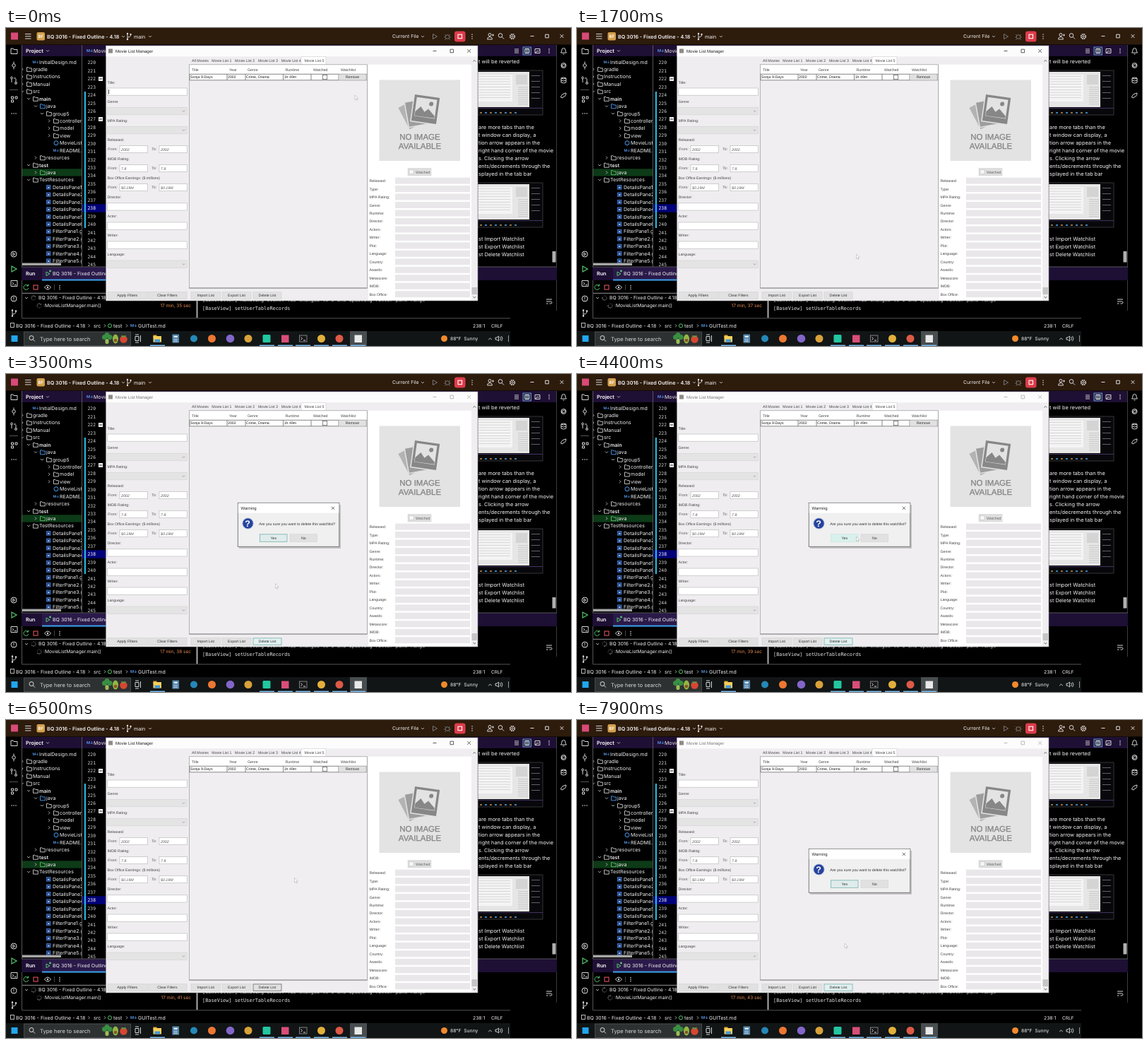
Write an HTML page that moves like this. It is 800 px wide and 450 px high and loops after 8000 ms.

```html
<!DOCTYPE html>
<html lang="en">
<head>
<meta charset="utf-8">
<title>Movie list manager</title>
<style>
html, body { margin: 0; width: 100%; height: 100%; overflow: hidden; background: #000; }
svg { display: block; width: 800px; height: 450px; }
text { text-rendering: geometricPrecision; white-space: pre; }
.ide { font-family: Inter, "Open Sans", sans-serif; }
.app { font-family: "Liberation Sans", Arial, sans-serif; }
.mono { font-family: "DejaVu Sans Mono", monospace; }
</style>
</head>
<body>
<svg id="stage" viewBox="0 0 800 450"></svg>
<script>
const LOOP = 8000;
const PROJECT = "BQ 3016 - Fixed Outline - 4.18";
const HEADER = "#1e0f35";
const stage = document.getElementById("stage");
let layer = stage;

function el(tag, attrs, parent = layer) {
  const node = document.createElementNS("http://www.w3.org/2000/svg", tag);
  for (const key in attrs) node.setAttribute(key, attrs[key]);
  parent.append(node);
  return node;
}
const rect = (x, y, w, h, fill, more = {}) => el("rect", { x, y, width: w, height: h, fill, ...more });
const box = (x, y, w, h, fill, stroke, sw = 0.7) => rect(x, y, w, h, fill, { stroke, "stroke-width": sw });
const dot = (cx, cy, r, fill, more = {}) => el("circle", { cx, cy, r, fill, ...more });
const line = (d, stroke = "#d6d6d6", sw = 1, more = {}) =>
  el("path", { d, stroke, "stroke-width": sw, fill: "none", ...more });
// y is the middle of the capitals
function text(str, x, y, size, fill, cls, more = {}) {
  const node = el("text", { x, y: y + size * 0.36, "font-size": size, fill, class: cls, ...more });
  node.textContent = str;
  return node;
}
const ide = (str, x, y, size = 7, fill = "#f2f2f2", more) => text(str, x, y, size, fill, "ide", more);
const app = (str, x, y, fill = "#444", more) => text(str, x, y, 5.25, fill, "app", more);
const mono = (str, x, y, size, fill = "#e4e4e4") => text(str, x, y, size, fill, "mono");
const bold = { "font-weight": 600 };
const mid = { "text-anchor": "middle" };
const chevron = (x, y, r = 2, color = "#bbb", up = 1) =>
  line(`M${x - r} ${y - up * r / 2}l${r} ${up * r}l${r} ${-up * r}`, color, 0.9);
const next = (x, y) => line(`M${x - 1} ${y - 2}l2 2l-2 2`, "#bbb", 0.9);
function group(parent = stage, attrs = {}) {
  layer = el("g", attrs, parent);
  return layer;
}
function dots(x, y, dx, dy) {
  for (const k of [-1, 0, 1]) dot(x + k * dx, y + k * dy, 0.8, "#d6d6d6");
}
function lens(x, y, r = 2.8) {
  dot(x - 1, y - 1, r, "none", { stroke: "#ddd", "stroke-width": 1 });
  line(`M${x + 1} ${y + 1}l3 3`);
}
function controls(x, y, gap, color, sw = 0.8) {
  return line(`M${x - 2.5} ${y}h5M${x + gap - 2.3} ${y - 2.3}h4.6v4.6h-4.6z` +
    `M${x + 2 * gap - 2.4} ${y - 2.4}l4.8 4.8m0 -4.8l-4.8 4.8`, color, sw);
}

function drawTopBar() {
  rect(0, 0, 800, 23.5, "#2d1b0c");
  rect(7, 6.5, 10, 10, "#d84a78");
  line("M27 8.5h8.5M27 11.7h8.5M27 15h8.5");
  rect(43.5, 6, 11.5, 11.5, "#d3a04c", { rx: 2 });
  ide("BF", 49.2, 11.8, 6, "#fff", { ...bold, ...mid });
  ide(PROJECT, 58, 12, 7.2, "#f2f2f2", bold);
  chevron(166, 12);
  line("M172 8.5v7M172 13q4.5 0 4.5-3");
  dot(172, 8, 1.2, "#ddd"); dot(176.5, 9, 1.2, "#ddd"); dot(172, 16, 1.2, "#ddd");
  ide("main", 181, 12, 7.2);
  chevron(204, 12);
  ide("Current File", 547, 12, 6.8);
  chevron(590, 12);
  line("M604.5 8.5l6 3.5l-6 3.5z", "#777");
  dot(625, 12.5, 2.8, "none", { stroke: "#777" });
  line("M621 9l2 2M629 9l-2 2M620 13h2m6 0h2M621 17l2-2m6 2l-2-2", "#777", 0.8);
  rect(635, 4.5, 15.5, 15, "#dd3c4b", { rx: 3 });
  box(640, 9.2, 5.5, 5.5, "none", "#fff", 1.1);
  dots(660, 12, 0, 3);
  dot(685, 9.5, 2, "none", { stroke: "#ddd" });
  line("M681.5 16q0-3.5 3.5-3.5t3.5 3.5zM688 10h3m-1.5-1.5v3");
  lens(701, 11.5);
  dot(717, 12, 3.3, "none", { stroke: "#ddd", "stroke-width": 1.6, "stroke-dasharray": "1.8 .8" });
  dot(717, 12, 1.3, "none", { stroke: "#ddd", "stroke-width": 0.8 });
  controls(745, 11.5, 21, "#ddd", 1);
}

function drawSidebars() {
  line("M7 29h3l1 1.5h5v6h-9z");
  dot(11, 53, 2.3, "none", { stroke: "#d6d6d6" });
  line("M11 47.5v3M11 55.5v3");
  line("M8 72v5M14 72v5M11 71h3");
  dot(8, 70.5, 1.4, "none", { stroke: "#ddd" }); dot(14, 78, 1.4, "none", { stroke: "#ddd" });
  line("M5 87.5h12", "#555");
  line("M7.5 97h3v3h-3zM13 97h3v3h-3zM7.5 102h3v3h-3z");
  dots(11, 121, 3, 0);
  dot(11, 320, 4, "none", { stroke: "#ddd" });
  line("M9.8 318l3 2l-3 2z");
  line("M8 337l7 4l-7 4z", "#56c66c", 1.2);
  line("M7 357.5h9v8h-9zM9 360l2 1.7l-2 1.7M12 363.5h2.5");
  dot(11, 383, 4, "none", { stroke: "#ddd" });
  line("M11 380.5v3M11 384.5v1");
  line("M9 400v7M9 405q5 0 5-4");
  dot(9, 399.5, 1.2, "#ddd"); dot(14, 400.5, 1.2, "#ddd"); dot(9, 407.5, 1.2, "#ddd");
  line("M785.5 35q1.5-1.5 1.5-4a2.5 2.5 0 0 1 5 0q0 2.5 1.5 4zM788.5 37h2");
  dot(789.5, 53, 3.5, "none", { stroke: "#ddd" });
  line("M787 55q0-4 3-4t1 3t-4-1", "#ddd", 0.9);
  line("M786 71v6q3.5 2 7 0v-6q-3.5-2-7 0q3.5 2 7 0M786 74q3.5 2 7 0");
  line("M785.5 98q1-5 7.5-6q0 5-4 5.5l-1 1.5z");
}

function drawTree() {
  rect(22, 24, 85, 16, HEADER);
  ide("Project", 28, 32.3, 7.3, "#fff", bold);
  chevron(59, 32.3);
  // name, indent, kind: d folder, b bold folder, f file, m class, g diagram
  const rows = ["InitialDesign.md|47|f", "gradle|38|d", "Instructions|38|d", "Manual|38|d", "src|38|d",
    "main|47|b", "java|57|d", "group5|66|d", "controller|76|d", "model|76|d", "view|76|d", "MovieListManager|76|m",
    "README.md|76|f", "resources|57|d", "test|47|b", "java|57|d", "TestResources|47|d"];
  for (let i = 1; i <= 6; i++) rows.push(`DetailsPane${i}.gif|66|g`);
  for (let i = 1; i <= 5; i++) rows.push(`FilterPane${i}.gif|66|g`);
  const open = [4, 5, 6, 7, 14, 16];
  const clip = el("clipPath", { id: "tree" });
  el("rect", { x: 22, y: 41, width: 85, height: 295 }, clip);
  const outer = layer;
  group(outer, { "clip-path": "url(#tree)" });
  rows.forEach((row, i) => {
    const [name, indent, kind] = row.split("|");
    const x = +indent, y = 48 + i * 10.43;
    if (i === 15) rect(22, y - 5.2, 85, 10.4, "#0d3a17");
    if (kind === "d" || kind === "b") {
      const color = i === 6 ? "#4a9df0" : i === 15 ? "#5bc46b" : "#cfcfcf";
      line(`M${x - 8.5} ${y - 2.8}h2.4l1 1.2h3.4v4.8h-6.8z`, color, 0.9);
      if (open.includes(i)) chevron(x - 15, y); else next(x - 15, y);
    } else if (kind === "m") {
      dot(x - 5, y, 3, "none", { stroke: "#4a9df0" });
    } else if (kind === "g") {
      box(x - 8.5, y - 2.7, 5.5, 5.5, "#1b3f7c", "#4a7fd6", 0.8);
      rect(x - 7, y - 0.5, 2.5, 1.8, "#a9c8f5");
    } else {
      ide("M↓", x - 9.5, y, 5, "#5a9df2", bold);
    }
    ide(name, x, y, 7, "#f2f2f2", kind === "b" ? bold : {});
  });
  layer = outer;
  rect(23, 332.5, 55, 3.5, "#a6a6a6");
  line("M22.5 24V410M107.5 24V338", "#6b6b6b", 0.8);
}

function drawEditor() {
  rect(108, 24, 672, 16, HEADER);
  ide("M↓", 114, 32.3, 5.5, "#5a9df2", bold);
  ide("MovieList", 124, 32.3);
  rect(108, 249.3, 34, 11.4, "#000078");
  for (let i = 0; i < 26; i++) mono(220 + i, 115.5, 49 + i * 11.44, 6.4, i === 18 ? "#fff" : "#d2d2d2");
  rect(110.8, 90, 2.2, 193, "#29b6e0");
  for (const y of [72, 129]) {
    rect(131, y - 3, 6, 6, "#f2f2f2");
    line(`M132 ${y}h4`, "#111", 0.9);
  }
}

function thumbnail(y) {
  rect(668, y, 92, 63, "#08080c");
  rect(668, y + 2, 73, 50, "#e6e6e6");
  rect(668, y + 6, 49, 38, "#f4f4f4");
  for (let i = 0; i < 9; i++) {
    rect(669, y + 8 + i * 3.8, 45, 0.6, "#c4c4c4");
    rect(725, y + 23 + i * 3, 14, 1.4, "#cfcfcf");
  }
  rect(722, y + 6, 16, 14, "#d4d4d4");
  for (let i = 0; i < 5; i++) rect(744, y + 7 + i * 8, 12, 0.8, "#77777d");
  rect(668, y + 53, 92, 1, "#43325f");
  for (let i = 0; i < 8; i++) rect(671 + i * 7, y + 59, 3, 2, i % 2 ? "#3f7fae" : "#8a7042");
  box(668, y, 92, 63, "none", "#555", 0.6);
}

function drawPreview() {
  rect(668, 40.5, 111, 297, "#000");
  line("M720 30h6M720 32.5h6M720 35h6");
  box(732, 27, 11.5, 11, "#26324e", "#7fa5e8", 0.8);
  line("M735 29.5h5.5v6h-5.5zM737.8 29.5v6", "#fff", 0.9);
  line("M749 29.5h7v6h-7zM750 35l2-3l1.5 1.5l1.5-2");
  dots(769, 32.5, 0, 2.6);
  const size = 7.4, left = 669;
  ide("t will be reverted", left, 47, size);
  thumbnail(60);
  ["are more tabs than the", "t window can display, a", "tion arrow appears in the", "right hand corner of the movie",
    "s. Clicking the arrow", "ents/decrements through the", "splayed in the tab bar"]
    .forEach((str, i) => ide(str, left, 140 + i * 11.05, size));
  thumbnail(219);
  ["Import", "Export", "Delete"].forEach((verb, i) => ide(`st ${verb} Watchlist`, left, 298.5 + i * 10.8, size));
  rect(773.5, 316, 5, 15.5, "#b0b0b0");
  line("M779.5 24V400", "#4d4d4d", 0.8);
}

let clock, spinners = [];
function drawRun() {
  rect(22, 338, 758, 19, HEADER);
  line("M22 338h758", "#6b6b6b", 0.8);
  ide("Run", 28, 347.7, 7.2, "#fff", bold);
  rect(51, 339, 92, 17, "#2a1a4a");
  line("M57 345l5 2.8l-5 2.8z", "#56c66c");
  dot(62.5, 344, 1.4, "#56c66c");
  ide(PROJECT, 66, 347.7, 7);
  rect(51, 355.6, 92, 1.9, "#3fa9f5");
  line("M31 364.5a3.5 3.5 0 1 0 .8 3.5M31.5 362.5v2.5h-2.5", "#56c66c");
  box(39, 364, 6, 6, "none", "#e0525e", 1.1);
  line("M54.5 367q4.5-6 9 0q-4.5 6-9 0z");
  dot(59, 367, 1.2, "#ddd");
  dots(76, 367, 0, 2.5);
  line("M68.5 363v8", "#555", 0.8);
  line("M23 375.3H270.5", "#a8a8a8", 0.9);
  line("M270.5 375.3V410", "#d8d8d8", 1.5);
  line("M22 410.8h692", "#6b6b6b", 0.8);
  chevron(29, 382, 2);
  ide(PROJECT, 46, 382, 6.8);
  ide(":MovieListManager.main()", 53, 393, 6.7);
  for (const [x, y] of [[39, 382], [47, 393]]) {
    const g = el("g", {});
    for (let k = 0; k < 8; k++) {
      const a = k * Math.PI / 4;
      el("circle", { cx: x + 3 * Math.cos(a), cy: y + 3 * Math.sin(a), r: 0.7, fill: "#ddd", opacity: 0.2 + k * 0.1 }, g);
    }
    spinners.push([g, x, y]);
  }
  clock = ide("", 262, 393, 6.5, "#e58a52", { "text-anchor": "end" });
  mono("[Controller] Handling event: Tab changed to 5 and updating filter pane range", 278, 385, 6.9);
  mono("[BaseView] setUserTableRecords", 278, 397, 6.9);
  line("M765 384h8M765 387h6.5q1.5 0 1.5 1.5t-1.5 1.5h-2M765 390h2.5");
}

function drawBottom() {
  box(6.5, 417.5, 5, 6, "none", "#ccc", 0.9);
  ide(PROJECT, 14, 421.3, 7);
  next(117.5, 421.3);
  ide("src", 124, 421.3);
  next(140, 421.3);
  dot(147, 421.3, 2.6, "none", { stroke: "#56c66c" });
  ide("test", 152, 421.3);
  next(171, 421.3);
  ide("M↓", 176, 421.3, 5.5, "#5a9df2", bold);
  ide("GUITest.md", 187, 421.3, 7);
  ide("238:1", 661, 421.3, 6.8);
  ide("CRLF", 687, 421.3, 6.5);
  rect(0, 429, 714, 21, "#111516");
  rect(7.5, 435, 9, 9, "#22a6ee");
  box(25.5, 430, 151, 19.5, "#2d3132", "#55595a");
  lens(37, 439.5, 3);
  text("Type here to search", 48, 440, 7.6, "#d5d5d5", "ide");
  rect(140.5, 440, 5, 7, "#9bbd56", { rx: 2 });
  for (const [x, y] of [[139.5, 437.5], [143, 434.5], [147, 437.5]]) dot(x, y, 3.5, "#398f42");
  el("ellipse", { cx: 155, cy: 440, rx: 4, ry: 6.5, fill: "#92b743" });
  dot(155, 442, 2.3, "#8a5229");
  dot(166.5, 440.5, 5.2, "#d84632");
  line("M163.5 435.5l3 1.5l3-1.5", "#55a645", 1.5);
  line("M183 436.5h5v6h-5zM190.5 435v9M183 434h5M183 445h5");
  rect(487, 429, 24, 21, "#484d4f");
  rect(208.5, 434.5, 5, 4, "#e0a82e");
  rect(208.5, 436, 11.5, 8.5, "#f7cf58");
  rect(210.5, 440.5, 7.5, 4, "#4699d6");
  box(236, 434, 8.5, 11, "#2e6b9c", "#90bddd");
  rect(237.5, 435.5, 5.5, 2.5, "#dfefff");
  for (let i = 0; i < 9; i++) rect(237.5 + i % 3 * 2, 439.3 + Math.floor(i / 3) * 1.8, 1.3, 1.1, "#fff");
  dot(266, 439.5, 5, "#2588b8");
  dot(291.5, 439.5, 5.5, "#ec7732");
  dot(317.5, 439.5, 5.8, "#8266c9");
  dot(343, 439.5, 5.5, "#d9a13a");
  rect(363.5, 434, 11, 11, "#22c6a0", { rx: 1.5 });
  rect(390, 434.5, 10.5, 10.5, "#d94e78");
  box(415.5, 435, 10.5, 9, "#171717", "#aaa");
  line("M417.5 437.5l2 2l-2 2M421 442h3");
  dot(446.5, 439.5, 5.5, "#e2b03a");
  dot(472, 439.5, 5.5, "#dd5a47");
  rect(493.5, 434.5, 10.5, 10.5, "#e9e9e9");
  for (const x of [204, 359, 385, 410, 436, 462, 488]) rect(x, 448.5, 21, 1.5, "#76b9ed");
  dot(620.5, 439.5, 4.5, "#f28a2c");
  ide("88°F  Sunny", 629, 440, 6.8);
  chevron(685.5, 440, 2.3, "#ddd", -1);
  line("M693 438h2l2.5-2v7l-2.5-2h-2zM699.5 437q2 2.5 0 5M701.5 436q3 3.5 0 7", "#ddd", 0.9);
  line("M711.5 435v9", "#aaa", 0.9);
}

const field = (x, y, w) => box(x, y, w, 10.2, "#fff", "#b4b4b4", 0.6);
function combo(y) {
  box(143.3, y, 113, 10.5, "#e4e4e4", "#d2d2d2", 0.6);
  chevron(251.5, y + 5.3, 1.6, "#999");
}
function button(label, x, y, w, h) {
  const face = box(x, y, w, h, "#e1e1e1", "#d0d0d0", 0.6);
  app(label, x + w / 2, y + h / 2, "#333", mid);
  return face;
}

let appTitle, appControls, caret, deleteButton;
function drawFilters() {
  const italic = { "font-style": "italic" };
  [["Title:", 77, 85], ["Director:", 239.5, 247.8], ["Actor:", 266.5, 275], ["Writer:", 293.5, 302]]
    .forEach(([label, y, top]) => { app(label, 143.5, y); field(143.3, top, 113); });
  [["Genre:", 104, 112.3], ["MPA Rating:", 131, 139.3], ["Language:", 320.5, 329]]
    .forEach(([label, y, top]) => { app(label, 143.5, y); combo(top); });
  [["Released:", 158, "2002", "2002"], ["IMDB Rating:", 185, "7.8", "7.8"],
    ["Box Office Earnings: ($ millions)", 212, "$0.19M", "$0.19M"]].forEach(([label, y, from, to]) => {
    app(label, 143.5, y);
    app("From:", 144, y + 13.5, "#555", italic);
    app("To:", 206, y + 13.5, "#555", italic);
    field(161, y + 8.5, 39.5);
    field(217, y + 8.5, 39.3);
    app(from, 163, y + 13.7, "#555", italic);
    app(to, 219, y + 13.7, "#555", italic);
  });
  caret = rect(145, 87, 0.8, 6.5, "#111");
  button("Apply Filters", 144, 373.5, 55.5, 10);
  button("Clear Filters", 201, 373.5, 55, 10);
}

function drawTable() {
  rect(418, 40.3, 35, 11.5, "#fff");
  line("M418 51.5V40.5h35v11", "#cfcfcf", 0.6);
  app("All Movies", 263, 46.3);
  for (let i = 1; i <= 5; i++) app(`Movie List ${i}`, 291.3 + (i - 1) * 32.8, i < 5 ? 46.3 : 45.8);
  box(259.5, 51.8, 252, 316.2, "#f0eef1", "#9a9a9a");
  rect(260, 52.5, 250.5, 12.5, "#fff");
  rect(260, 65.3, 250.5, 8.7, "#fff");
  const cols = [260, 313, 339, 392.5, 432, 471, 510];
  line("M260 65.3h250.5M260 73.8h250.5" + cols.map(x => `M${x} 65.3v8.5`).join(""), "#555", 0.7);
  [["Title", 263], ["Year", 316], ["Genre", 342], ["Runtime", 395.5], ["Watched", 435], ["Watchlist", 474]]
    .forEach(([label, x]) => app(label, x, 59.3));
  [["Sonja 9-Days", 261], ["2002", 314], ["Crime, Drama", 340], ["1h 49m", 393.7]]
    .forEach(([label, x]) => app(label, x, 69.6, "#222"));
  box(448.5, 66.5, 6.2, 6.2, "#fff", "#555");
  button("Remove", 471.5, 65.8, 38, 7.5);
  line("M259.5 368h252", "#777", 0.8);
  button("Import List", 262, 373.5, 41.5, 10);
  button("Export List", 306, 373.5, 41, 10);
  deleteButton = button("Delete List", 350, 373.8, 40, 9.4);
}

function drawPlaceholder() {
  rect(528.5, 73.5, 114.5, 114.5, "#e3e3e3");
  const edge = { stroke: "#e3e3e3", "stroke-width": 1.5 };
  rect(561, 103, 32, 36, "#b3b3b3", { ...edge, transform: "rotate(-28 577 121)" });
  rect(567, 102, 32, 36, "#9d9d9d", { ...edge, transform: "rotate(-10 583 120)" });
  const outer = layer;
  group(outer, { transform: "rotate(8 594 115)" });
  rect(575.5, 95.5, 37, 39, "#878787", edge);
  rect(579.5, 99.5, 29, 27, "#e3e3e3");
  el("path", { d: "M580 126v-6l7-8l6 7l5-5l10 9v3z", fill: "#878787" });
  dot(601, 106.5, 3, "#878787");
  layer = outer;
  const big = { ...mid, stroke: "#858585", "stroke-width": 0.3 };
  text("NO IMAGE", 586, 154, 11.5, "#858585", "app", big);
  text("AVAILABLE", 586, 167, 11.5, "#858585", "app", big);
}

function drawDetails() {
  rect(513, 51.8, 146, 333.7, "#fff");
  drawPlaceholder();
  box(569, 198.5, 33, 10.5, "#dedede", "#d2d2d2", 0.5);
  box(571, 200.5, 6, 6, "#f7f7f7", "#bbb", 0.5);
  app("Watched", 580, 203.9, "#666");
  ["Released", "Type", "MPA Rating", "Genre", "Runtime", "Director", "Actors", "Writer", "Plot", "Language",
    "Country", "Awards", "Metascore", "IMDB", "Box Office"].forEach((label, i) => {
    const y = 216.2 + i * 11.47;
    app(label + ":", 514.5, y);
    rect(551, y - 4.6, 106, 9, "#e9e7ea");
  });
  rect(659, 41, 8.5, 344.5, "#f0eef1");
  rect(659.5, 367, 7.5, 10, "#c6c6c6");
  chevron(663.3, 46.5, 1.9, "#555", -1);
  chevron(663.3, 381, 1.9, "#555");
}

function drawApp() {
  rect(141.5, 25, 526.5, 361, "#efedf0");
  rect(141.5, 25, 526.5, 15.3, "#fcfcfc");
  rect(145, 29.5, 6, 6, "#8f8a88");
  appTitle = text("Movie List Manager", 155, 32.5, 6.1, "#222", "app");
  appControls = controls(607, 32.5, 24.3, "#333");
  drawFilters();
  drawTable();
  drawDetails();
  box(141.5, 25, 526.5, 361, "none", "#8b8b8b", 0.6);
}

let yesFace;
function drawDialog() {
  const g = group();
  rect(330, 185, 144, 62, "#000", { opacity: 0.18 });
  box(328.3, 182.3, 143.5, 62, "#f0f0f0", "#6e6e6e", 0.9);
  rect(328.8, 182.8, 142.5, 14, "#fff");
  text("Warning", 332.5, 190, 6, "#222", "app");
  line("M460.8 187.7l4.2 4.2m0 -4.2l-4.2 4.2", "#444", 0.8);
  dot(342.5, 211.5, 7.6, "#27449f", { stroke: "#a9b4d8", "stroke-width": 0.8 });
  text("?", 342, 211.5, 12.5, "#fff", "app", { ...mid, "font-weight": 700 });
  app("Are you sure you want to delete this watchlist?", 358.3, 212, "#333");
  yesFace = button("Yes", 359.5, 226.8, 38.5, 10.5);
  button("No", 402, 226.8, 38.5, 10.5);
  return g;
}

group();
rect(0, 0, 800, 450, "#000");
drawTopBar();
drawSidebars();
drawTree();
drawEditor();
drawPreview();
drawRun();
drawBottom();
group();
drawApp();
const dialog = drawDialog();
const cursor = group();
el("path", { d: "M0 0v6.5l1.5-1.4l1.1 2.4l1-.5l-1.1-2.3h2z", fill: "#fff", stroke: "#999", "stroke-width": 0.45 });

// time, x, y
const path = [[0, 494, 95], [400, 494, 95], [1700, 395.5, 320], [2250, 371, 381], [3000, 371, 382],
  [3900, 389, 236], [4400, 395.5, 230], [4800, 420, 231], [5250, 421, 231], [5700, 420.5, 168], [6200, 419, 172],
  [7100, 379, 370], [7500, 378, 374], [7900, 379, 316], [8000, 379, 298]];

function cursorAt(t) {
  const i = path.findIndex(p => p[0] > t);
  const [t0, x0, y0] = path[i - 1], [t1, x1, y1] = path[i];
  const k = (t - t0) / (t1 - t0), e = k * k * (3 - 2 * k);
  return [x0 + (x1 - x0) * e, y0 + (y1 - y0) * e];
}
const inside = (x, y, left, top, right, bottom) => x > left && x < right && y > top && y < bottom;
const paint = (node, fill, stroke, sw = 0.6) => {
  node.setAttribute("fill", fill);
  node.setAttribute("stroke", stroke);
  node.setAttribute("stroke-width", sw);
};

function render(t) {
  const [x, y] = cursorAt(t);
  cursor.setAttribute("transform", `translate(${x} ${y})`);
  const asking = (t >= 2600 && t < 5200) || t >= 7550;
  dialog.style.display = asking ? "" : "none";
  appTitle.setAttribute("fill", asking ? "#777" : "#222");
  appControls.setAttribute("stroke", asking ? "#aaa" : "#333");
  caret.style.display = t < 2500 && t % 1000 < 500 ? "" : "none";

  if (asking || inside(x, y, 350, 369, 390, 384)) paint(deleteButton, "#e2f0ef", "#7fb9b5", 0.9);
  else if (t > 2500) paint(deleteButton, "#e1e1e1", "#777", 0.9);
  else paint(deleteButton, "#e1e1e1", "#d0d0d0");

  if (inside(x, y, 359, 226, 398, 238)) paint(yesFace, "#d9f1ec", "#c3dfda");
  else paint(yesFace, "#e0eceb", "#7fb9b5", 0.9);

  clock.textContent = `17 min, ${35 + Math.floor((t + 450) / 1000)} sec`;
  const turn = Math.floor(t / 125) * 45;
  for (const [node, cx, cy] of spinners) node.setAttribute("transform", `rotate(${turn} ${cx} ${cy})`);
}

const start = performance.now();
function tick(now) {
  render(Math.max(0, now - start) % LOOP);
  requestAnimationFrame(tick);
}
render(0);
requestAnimationFrame(tick);
</script>
</body>
</html>
```
